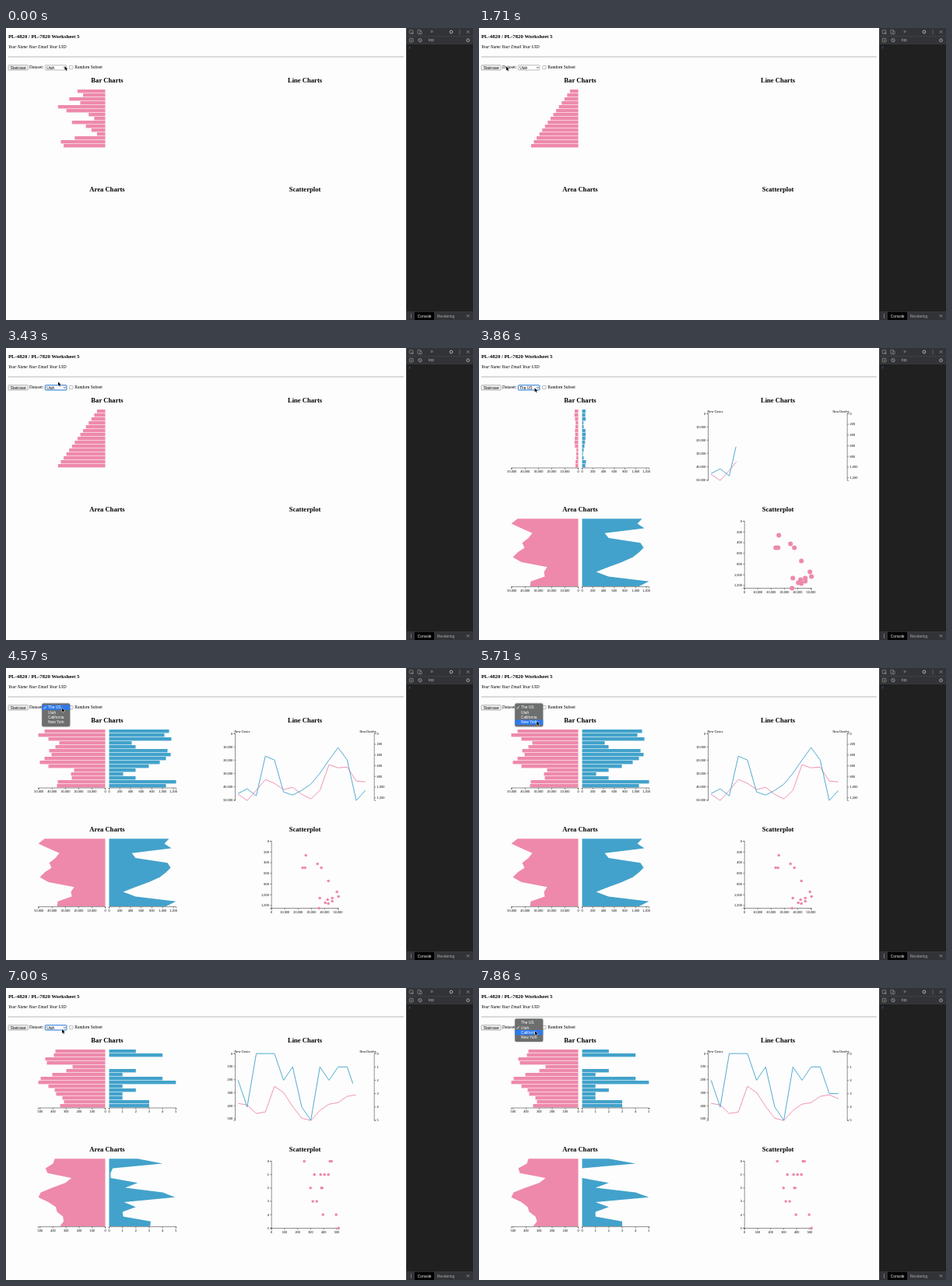
An HTML page with a canvas for the animation above (8000 ms loop, 600x375 px).

```html
<!DOCTYPE html>
<html lang="en">
<head>
<meta charset="utf-8">
<title>Linked charts</title>
<style>
  html, body { margin: 0; width: 100%; height: 100%; overflow: hidden; background: #fdfdfd; }
  canvas { display: block; width: 600px; height: 375px; }
</style>
</head>
<body>
<canvas id="stage"></canvas>
<script>
const canvas = document.getElementById('stage');
const ctx = canvas.getContext('2d');
const ratio = Math.max(1, window.devicePixelRatio || 1);
canvas.width = 600 * ratio;
canvas.height = 375 * ratio;

const LOOP = 8000, FRAMES = 56, STEP = LOOP / FRAMES;
const PINK = '#ee89ab', BLUE = '#42a2cb';
const SERIF = '"Liberation Serif", "Times New Roman", serif';
const SANS = '"Liberation Sans", Arial, sans-serif';
const SPAN = 86;
const STAIR_AT = 1100, NATION_AT = 3486, STATE_AT = 6245;

// Values are bar lengths in pixels.
const shuffled = [7, 5, 10, 6, 14, 11, 3, 1, 9, 4, 2, 0, 8, 13, 12];
const nation = {
  cases: [78, 86, 73, 59, 64, 72, 69, 78, 84, 73, 40, 44, 43, 61, 62],
  deaths: [77, 71, 80, 29, 34, 75, 79, 73, 65, 51, 34, 18, 34, 86, 73],
  caseAxis: { step: 10000, px: 17.05, n: 6 },
  deathAxis: { step: 200, px: 13.75, n: 7 }
};
const state = {
  cases: [64, 66, 77, 75, 42, 50, 68, 83, 86, 73, 65, 63, 55, 53, 58],
  deaths: [2, 4, 0, 0, 0, 2, 1, 4, 5, 1, 2, 1, 1, 3, 3].map(v => v * 17.15),
  caseAxis: { step: 100, px: 16.75, n: 6 },
  deathAxis: { step: 1, px: 17.15, n: 6 }
};
const options = ['The US', 'Utah', 'California', 'New York'];
const menus = [
  { from: 2500, to: 3400, hot: 3100, top: 39.4, picked: 1 },
  { from: 4400, to: 6100, hot: 4400, top: 45.6, picked: 0 },
  { from: 7500, to: 8000, hot: 7500, top: 39.4, picked: 1 }
];
// time, x, y of the pointer tip
const path = [
  [0, 75.5, 49], [860, 21, 49.5], [1570, 21, 49.5], [1710, 35, 49.5], [2280, 72, 49.5],
  [2700, 72, 48.5], [3000, 70, 46.3], [3280, 67, 43.5], [3430, 67, 43.5], [3860, 71.5, 51.3],
  [5000, 72, 51.3], [5570, 75, 73], [6000, 72, 55.5], [6140, 72, 55], [6430, 72, 53],
  [7500, 72, 53], [7860, 72, 55.3], [8000, 72, 55.3]
];

const clamp = v => Math.min(1, Math.max(0, v));
const mix = (a, b, p) => a + (b - a) * p;
const blend = (a, b, p) => a.map((v, i) => mix(v, b[i], p));
const cubic = t => t < 0.5 ? 4 * t ** 3 : 1 - 4 * (1 - t) ** 3;
const progress = (t, start, length) => cubic(clamp((t - start) / length));

function rect(x, y, w, h, color) {
  ctx.fillStyle = color;
  ctx.fillRect(x, y, w, h);
}

function box(x, y, w, h, r, fill, stroke, width = 0.5) {
  ctx.beginPath();
  ctx.roundRect(x, y, w, h, r);
  if (fill) { ctx.fillStyle = fill; ctx.fill(); }
  if (stroke) { ctx.strokeStyle = stroke; ctx.lineWidth = width; ctx.stroke(); }
}

function text(str, x, y, size, { family = SANS, style = '', color = '#000', align = 'left' } = {}) {
  ctx.font = `${style} ${size}px ${family}`;
  ctx.fillStyle = color;
  ctx.textAlign = align;
  ctx.fillText(str, x, y);
}

function line(points, color, width = 0.5) {
  ctx.beginPath();
  points.forEach(([x, y]) => ctx.lineTo(x, y));
  ctx.strokeStyle = color;
  ctx.lineWidth = width;
  ctx.stroke();
}

function circle(x, y, r, fill, stroke, width = 0.7) {
  ctx.beginPath();
  ctx.arc(x, y, r, 0, Math.PI * 2);
  if (fill) { ctx.fillStyle = fill; ctx.fill(); }
  if (stroke) { ctx.strokeStyle = stroke; ctx.lineWidth = width; ctx.stroke(); }
}

const label = n => n.toLocaleString('en-US');

function axisX(x, y, dir, { step, px, n }) {
  line([[x, y + 2], [x, y], [x + dir * SPAN, y], [x + dir * SPAN, y + 2]], '#222');
  for (let i = 0; i < n; i++) {
    const tx = x + dir * i * px;
    line([[tx, y], [tx, y + 2]], '#222');
    text(label(i * step), tx, y + 6, 3.9, { align: 'center' });
  }
}

function axisY(x, y, dir, { step, px, n }) {
  line([[x + dir * 2, y], [x, y], [x, y + SPAN], [x + dir * 2, y + SPAN]], '#222');
  for (let i = 0; i < n; i++) {
    const ty = y + i * px;
    line([[x, ty], [x + dir * 2, ty]], '#222');
    text(label(i * step), x + dir * 3.4, ty + 1.4, 3.9, { align: dir < 0 ? 'right' : 'left' });
  }
}

function bars(values, x, dir, color) {
  values.forEach((v, i) => rect(dir < 0 ? x - v : x, 79 + i * 5, v, 4.4, color));
}

function area(values, x, dir, color) {
  ctx.beginPath();
  ctx.moveTo(x, 219.2);
  values.forEach((v, i) => ctx.lineTo(x + dir * v, 219.2 + i * 6.2));
  ctx.lineTo(x, 306);
  ctx.fillStyle = color;
  ctx.fill();
}

function plot(values, color, p) {
  const points = values.map((v, i) => [298.2 + i * 11.68, 84.2 + v]);
  let total = 0;
  for (let i = 1; i < points.length; i++) {
    total += Math.hypot(points[i][0] - points[i - 1][0], points[i][1] - points[i - 1][1]);
  }
  if (p < 1) ctx.setLineDash([total * p, total * 2]);
  line(points, color, 0.9);
  ctx.setLineDash([]);
}

function charts(t) {
  if (t < NATION_AT) {
    const order = t < STAIR_AT ? shuffled : shuffled.map((_, i) => i);
    bars(order.map(n => 10.6 + n * 3.57), 127.5, -1, PINK);
    return;
  }
  const later = t >= STATE_AT;
  const data = later ? state : nation;
  const quick = progress(t, STATE_AT, 500), slow = progress(t, STATE_AT, 1000);
  const enter = progress(t, NATION_AT + 250, 500);
  const drawn = progress(t, later ? STATE_AT : NATION_AT, 1000);
  const cases = blend(nation.cases, state.cases, quick);
  const deaths = blend(nation.deaths, state.deaths, quick);

  bars(cases.map(v => v * enter), 127.5, -1, PINK);
  bars(deaths.map(v => v * enter), 132.5, 1, BLUE);
  area(blend(nation.cases, state.cases, slow), 127.5, -1, PINK);
  area(blend(nation.deaths, state.deaths, slow), 132.5, 1, BLUE);
  for (const y of [154, 306.6]) {
    axisX(127.5, y, -1, data.caseAxis);
    axisX(132.5, y, 1, data.deathAxis);
  }

  axisY(294.5, 84.2, -1, data.caseAxis);
  axisY(473.2, 84.2, 1, data.deathAxis);
  text('New Cases', 303.5, 83, 3.9, { align: 'center' });
  text('New Deaths', 465, 83, 3.9, { align: 'center' });
  plot(data.cases, PINK, drawn);
  plot(data.deaths, BLUE, drawn);

  axisY(341.2, 222.5, -1, data.deathAxis);
  axisX(341.2, 308.5, 1, data.caseAxis);
  const r = mix(3.1, 1.8, enter);
  cases.forEach((v, i) => circle(341.2 + v, 222.5 + deaths[i], r, PINK));
}

function page(t) {
  rect(0, 0, 514, 375, '#fdfdfd');
  text('PL-4820 / PL-7820 Worksheet 5', 3, 12.8, 6.72, { family: SERIF, style: 'bold' });
  text('Your Name Your Email Your UID', 3, 26, 5.6, { family: SERIF, style: 'italic' });
  line([[3, 37], [511, 37]], '#999', 0.7);

  const hover = t > 700 && t < 1700;
  box(3, 47.7, 25.3, 6.4, 0.8, hover ? '#e2e2e2' : '#efefef', '#777');
  text('Staircase', 15.7, 52.5, 4.75, { align: 'center' });
  text('Dataset:', 30, 52.4, 5.6, { family: SERIF });
  const focus = t >= 3400;
  box(50.3, 47.8, 27.6, 6.2, 0.8, '#fff', focus ? '#1b72d8' : '#777', focus ? 1 : 0.5);
  text(t >= NATION_AT && t < STATE_AT ? 'The US' : 'Utah', 52.2, 52.5, 4.75);
  line([[74, 50.2], [75.4, 51.6], [76.8, 50.2]], '#000', 0.7);
  box(81.6, 48.4, 4.4, 4.4, 0.8, '#fff', '#777');
  text('Random Subset', 88.2, 52.4, 5.65, { family: SERIF });

  const title = { family: SERIF, style: 'bold', align: 'center' };
  text('Bar Charts', 130, 69.6, 8.6, title);
  text('Line Charts', 384, 69.6, 8.6, title);
  text('Area Charts', 130, 209.6, 8.6, title);
  text('Scatterplot', 384, 209.6, 8.6, title);
}

const ICON = '#a4a6a8';

function gear(x, y) {
  circle(x, y, 1.7, null, ICON, 0.9);
  for (let i = 0; i < 8; i++) {
    const c = Math.cos(i * Math.PI / 4), s = Math.sin(i * Math.PI / 4);
    line([[x + c * 1.8, y + s * 1.8], [x + c * 2.6, y + s * 2.6]], ICON, 0.8);
  }
}

function cross(x, y) {
  line([[x - 1.7, y - 1.7], [x + 1.7, y + 1.7]], ICON, 0.7);
  line([[x - 1.7, y + 1.7], [x + 1.7, y - 1.7]], ICON, 0.7);
}

function dots(x, y) {
  for (const d of [-2, 0, 2]) circle(x, y + d, 0.6, ICON);
}

function panel() {
  rect(514, 0, 86, 375, '#202020');
  rect(514, 0, 86, 20.5, '#323336');
  rect(514, 364.5, 86, 10.5, '#323336');
  rect(514, 10.2, 86, 0.5, '#4a4b4d');
  rect(514, 20.4, 86, 0.5, '#4a4b4d');
  rect(514, 364.2, 86, 0.5, '#4a4b4d');
  rect(514, 0, 0.6, 375, '#4a4b4d');

  box(518.3, 2.7, 4.6, 4.6, 0.6, null, ICON, 0.6);
  line([[523.5, 8], [520.8, 5.2]], ICON, 0.8);
  box(529, 2.4, 3.6, 5.2, 0.4, null, ICON, 0.6);
  box(531.8, 4.2, 2.4, 3.6, 0.4, '#323336', ICON, 0.6);
  text('»', 547, 6.9, 6.5, { color: ICON, align: 'center' });
  gear(572, 5);
  dots(583, 5);
  cross(593.5, 5);

  box(518.3, 13.4, 4.8, 4.6, 0.4, null, ICON, 0.6);
  line([[520, 14.5], [521.5, 15.7], [520, 16.9]], ICON, 0.6);
  circle(532, 15.7, 2.2, null, ICON, 0.7);
  line([[530.5, 14.2], [533.5, 17.2]], ICON, 0.7);
  text('top', 542.8, 17.3, 4.9, { color: '#b5b7b9' });
  gear(593.5, 15.7);
  line([[518, 23.8], [519.4, 25.2], [518, 26.6]], '#367cf1', 0.7);

  dots(520.5, 369.7);
  rect(525, 364.7, 25, 10.3, '#000');
  text('Console', 537.6, 371.5, 4.9, { color: '#eee', align: 'center' });
  text('Rendering', 565, 371.5, 4.9, { color: ICON, align: 'center' });
  cross(593.5, 369.7);
}

function pointer(t) {
  let i = 1;
  while (path[i][0] < t && i < path.length - 1) i++;
  const [t0, x0, y0] = path[i - 1], [t1, x1, y1] = path[i];
  const p = clamp((t - t0) / (t1 - t0));
  const eased = p * p * (3 - 2 * p);
  return [mix(x0, x1, eased), mix(y0, y1, eased)];
}

function menu(t, tipY) {
  const open = menus.find(m => t >= m.from && t < m.to);
  if (!open) return;
  const { top, picked, hot } = open;
  ctx.save();
  ctx.shadowColor = 'rgba(0,0,0,.35)';
  ctx.shadowBlur = 2 * ratio;
  box(46.2, top, 36, 29.6, 1.8, '#6d6e6e');
  ctx.restore();
  const active = t >= hot ? Math.floor((tipY - top - 2) / 6.35) : -1;
  options.forEach((name, i) => {
    const y = top + 5.1 + i * 6.35;
    if (i === active) rect(46.2, y - 3.2, 36, 6.35, '#2d79ee');
    text(name, 54, y + 1.7, 4.85, { color: '#fff' });
    if (i === picked) line([[48.4, y + 0.2], [49.6, y + 1.6], [51.6, y - 1.8]], '#fff', 0.7);
  });
}

function arrow(x, y) {
  ctx.save();
  ctx.translate(x, y);
  ctx.beginPath();
  for (const [px, py] of [[0, 0], [0, 5], [1.2, 4], [2, 6], [2.9, 5.6], [2.1, 3.8], [3.7, 3.7]]) ctx.lineTo(px, py);
  ctx.closePath();
  ctx.lineJoin = 'round';
  ctx.strokeStyle = '#fff';
  ctx.lineWidth = 0.8;
  ctx.stroke();
  ctx.fillStyle = '#000';
  ctx.fill();
  ctx.restore();
}

function draw(t) {
  ctx.setTransform(ratio, 0, 0, ratio, 0, 0);
  page(t);
  charts(t);
  panel();
  const [x, y] = pointer(t);
  menu(t, y);
  arrow(x, y);
}

const begin = performance.now();
function tick() {
  const t = (performance.now() - begin) % LOOP;
  draw(Math.floor((t + 5) / STEP) % FRAMES * STEP);
  requestAnimationFrame(tick);
}
tick();
</script>
</body>
</html>
```
